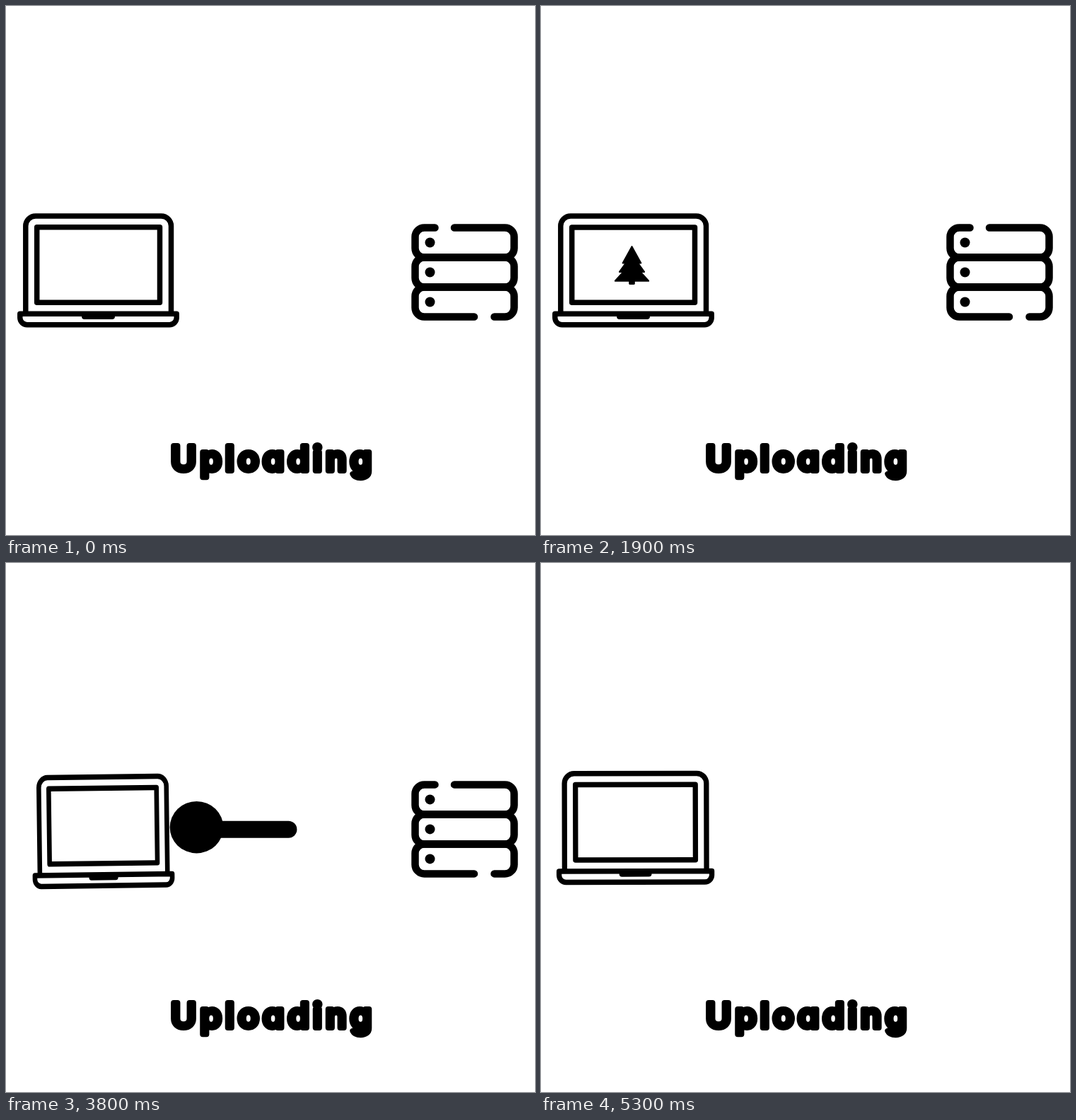
Write an HTML page that moves like this. It is 748 by 748 pixels and loops after 5.4 s.

```html
<!DOCTYPE html>
<html lang="en">
<head>
<meta charset="utf-8">
<title>Uploading</title>
<style>
  html, body { margin: 0; width: 100%; height: 100%; overflow: hidden; background: #fff; }
  svg { display: block; width: 100%; height: 100%; }
  .line { fill: none; stroke: #000; stroke-linecap: round; stroke-linejoin: round; }
  .paper { fill: #fff; }
  #laptop .line { stroke-width: 7.5; }
  #server .line { stroke-width: 10.5; }
  #label {
    font: 500 48px Inter, "Open Sans", sans-serif;
    font-feature-settings: "cv11";
    letter-spacing: 5.9px;
    text-anchor: middle;
    stroke: #000;
    stroke-width: 8;
    stroke-linejoin: round;
  }
</style>
</head>
<body>
<svg viewBox="0 0 748 748">
  <ellipse id="ball"/>
  <rect id="bar"/>

  <!-- Laptop, drawn around its centre -->
  <g id="laptop">
    <path class="line paper" d="M-102.7 61.5V-62.5a14 14 0 0 1 14-14H89a14 14 0 0 1 14 14V61.5"/>
    <rect class="line" x="-86.8" y="-60.7" width="173.8" height="106.5"/>
    <path class="line paper" d="M-110.7 61.7H110.7V67.2a10 10 0 0 1-10 10H-100.7a10 10 0 0 1-10-10Z"/>
    <path d="M-23.5 61H23.5V65.5a4 4 0 0 1-4 4H-19.5a4 4 0 0 1-4-4Z"/>
  </g>

  <!-- Server, drawn around its centre -->
  <g id="server">
    <rect class="paper" x="-70" y="-63" width="140" height="126" rx="13"/>
    <path class="line" d="M-42 -63H-57a13 13 0 0 0-13 13V-34a13 13 0 0 0 13 13H57a13 13 0 0 0 13-13V-50a13 13 0 0 0-13-13H-14.5"/>
    <rect class="line" x="-70" y="-21" width="140" height="42" rx="13"/>
    <path class="line" d="M13.5 63H-57a13 13 0 0 1-13-13V34a13 13 0 0 1 13-13H57a13 13 0 0 1 13 13V50a13 13 0 0 1-13 13H42"/>
    <circle cx="-49" cy="-42" r="7"/>
    <circle cx="-49" r="7"/>
    <circle cx="-49" cy="42" r="7"/>
  </g>

  <!-- Tree, drawn around its centre -->
  <g id="tree">
    <path d="M0-66L36-7.5H24L49 23.5H34L66 55.5H-66L-34 23.5H-49L-24-7.5H-36Z"
          stroke="#000" stroke-width="5" stroke-linejoin="round"/>
    <rect x="-12" y="50" width="24" height="18.5" rx="3.5"/>
  </g>

  <text id="label" x="378" y="657">Uploading</text>
</svg>
<script>
  const STEP = 100, COUNT = 54;
  const $ = id => document.getElementById(id);
  const mix = (a, b, k) => a + (b - a) * k;

  // Eased 0 to 1 between two steps
  function ramp(n, from, to) {
    const k = Math.min(1, Math.max(0, (n - from) / (to - from)));
    return k * k * (3 - 2 * k);
  }

  // Smooth swell to 1 and back around a step
  const bump = (n, mid, width) => Math.exp(-(((n - mid) / width) ** 2));

  function pose(id, x, y, turn, sx, sy) {
    $(id).setAttribute('transform',
      `translate(${x} ${y}) rotate(${turn}) scale(${sx} ${sy})`);
  }

  function set(id, attrs) {
    for (const name in attrs) $(id).setAttribute(name, attrs[name]);
  }

  function draw(n) {
    const squash = .38 * bump(n, 14.4, 1.8);  // tree lands on the laptop
    const hop = bump(n, 31, 3.4);             // laptop and ball jump
    const recoil = bump(n, 38.5, 2);          // bar shoots out
    drawLaptop(n, squash, hop, recoil);
    drawTree(n, squash, hop);
    drawBall(n, hop);
    drawBar(n, recoil);
    drawServer(n);
  }

  function drawLaptop(n, squash, hop, recoil) {
    const swell = bump(n, 24, 1.3);
    const pinch = ramp(n, 26, 34) - ramp(n, 50.5, 54);
    const shift = ramp(n, 27, 34) - ramp(n, 52, 55);
    pose('laptop',
      130.5 + 4 * shift - 8 * hop + 3 * recoil,
      373.5 + 118 * squash - 3 * swell + 3 * pinch - 18 * hop + 3 * recoil,
      -9.5 * hop - .6 * pinch,
      1 + .025 * swell - .123 * pinch,
      1 + .04 * swell - squash);
  }

  function drawTree(n, squash, hop) {
    const fall = -68.5 + 3.79 * Math.max(0, n - 3) ** 2;
    const ride = 225.5 + 199 * squash;
    const sink = ramp(n, 15, 19);
    const windup = ramp(n, 25, 31);
    const launch = ramp(n, 31, 35);
    const size = 1 - ramp(n, 33, 36);
    pose('tree',
      mix(mix(130.5, 128.5, sink) - 24 * windup, 268, launch),
      mix(Math.min(fall, ride), 366.5, sink) - 19 * hop,
      90 * ramp(n, 22, 29) - 10 * hop,
      size * (mix(1, .36, sink) + .06 * windup),
      size * (mix(1, .4, sink) + .09 * windup));
  }

  function drawBall(n, hop) {
    const pop = bump(n, 25.5, 1.2);
    const gulp = bump(n, 37, 2);
    const settle = ramp(n, 34, 45);
    const size = ramp(n, 22, 25) * (1 - ramp(n, 45, 52));
    set('ball', {
      cx: mix(215, 268, ramp(n, 22, 26)) + 30 * pop + 5 * settle,
      cy: 374 - 30 * hop + .5 * settle,
      rx: size * (33 + 9 * pop + 7 * gulp - 2 * settle),
      ry: size * (34 + 4 * gulp - 1.5 * settle)
    });
  }

  function drawBar(n, recoil) {
    const head = mix(268, 600, ramp(n, 36, 40.4));
    const tail = mix(268, 600, ramp(n, 46, 52));
    const height = mix(24, 15, ramp(n, 38, 45));
    set('bar', {
      x: tail, y: 374 + 3 * recoil - height / 2,
      width: head - tail, height, rx: height / 2
    });
  }

  function drawServer(n) {
    const jump = bump(n, 43, 2.1);
    const swell = bump(n, 48.8, 2);
    const size = n < 53 ? 1 + .14 * swell : 0;
    pose('server', 648.5 + 2 * ramp(n, 40, 42), 376.5 - 27 * jump - 12 * swell, 0, size, size);
  }

  let start;
  function tick(now) {
    start ??= now;
    draw(Math.floor((now - start) / STEP) % COUNT);
    requestAnimationFrame(tick);
  }
  draw(0);
  requestAnimationFrame(tick);
</script>
</body>
</html>
```
